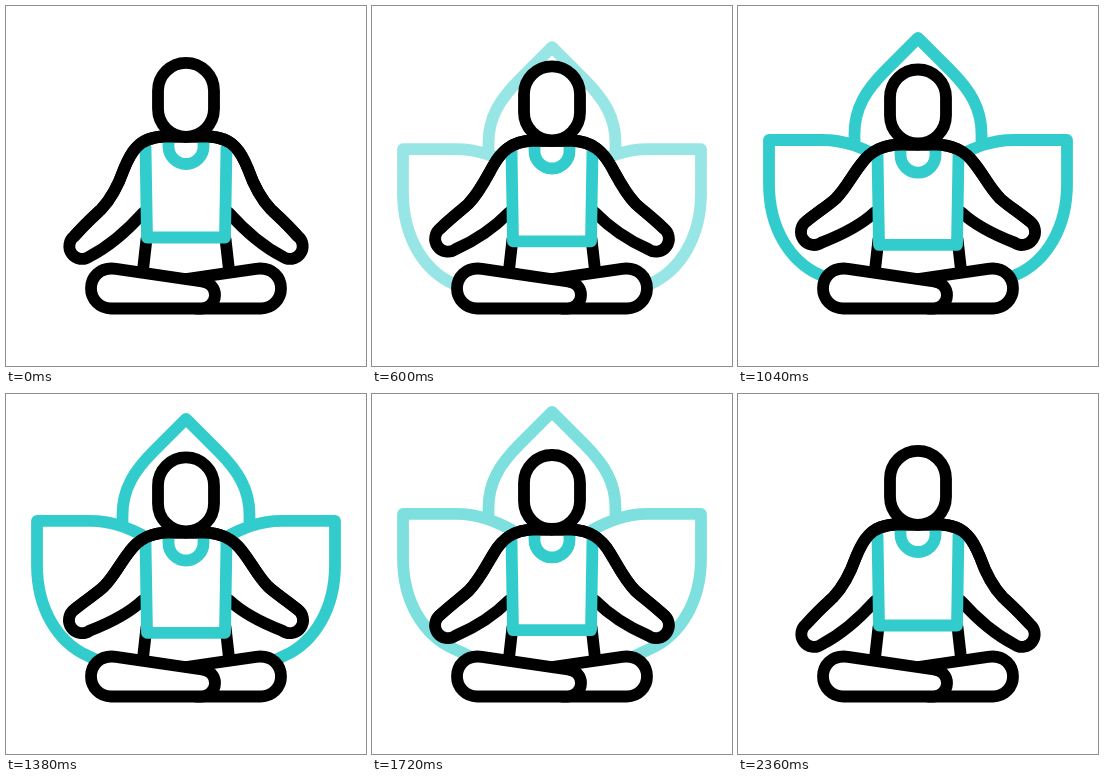
An HTML page with a canvas that plays this animation: 360 px wide and 360 px high, repeating every 2400 ms.

```html
<!DOCTYPE html>
<html lang="en">
<head>
<meta charset="utf-8">
<title>Meditation</title>
<style>
  html, body { margin: 0; width: 100%; height: 100%; overflow: hidden; background: #fff; }
  canvas { display: block; width: 360px; height: 360px; }
</style>
</head>
<body>
<canvas id="stage" width="360" height="360"></canvas>
<script>
const LOOP = 2400;
const LINE = 11.8;
const TEAL = '#33cccc';
const BLACK = '#000';
const ctx = document.getElementById('stage').getContext('2d');

const clamp = v => Math.max(0, Math.min(1, v));
const mix = (a, b, k) => a.map((v, i) => v + (b[i] - v) * k);

// Upper arm contour: three cubic curves from the shoulder to the hand.
const ARM_LOW = [158, 130.5, 132, 131, 124, 148, 118, 163, 112, 180, 106, 192, 95, 203.5, 88, 210, 80, 217, 68.5, 230];
const ARM_HIGH = [163, 139, 146, 139, 133, 145, 124, 157, 114, 169, 108, 182, 98, 192, 91, 198.5, 82, 204, 68.5, 214.5];

// Lower arm contour: one curve from the hand to the waist.
const UNDER_LOW = [83.5, 250.5, 100, 242, 120, 226, 137, 207];
const UNDER_HIGH = [83.5, 236, 102, 229, 122, 220, 137, 206];

const LOTUS_HALF = new Path2D(
  'M180 32L148 64C128 84 116.5 102 116.5 128V139' +
  'M140 150C124 142 108 134 84 134H31V178C31 221 51 255 82 269L112 283');
const lotus = new Path2D(LOTUS_HALF);
lotus.addPath(LOTUS_HALF, new DOMMatrix([-1, 0, 0, 1, 360, 0]));

const backLeg = new Path2D('M180 273L250 262.8C267 260.5 275 272 275 282.5A20 20 0 0 1 255 302.5H190');
const frontLeg = new Path2D('M195 302.5H105A20 20 0 0 1 85 282.5C85 272 93 260.5 110 262.8L196 275.5A13.5 13.5 0 0 1 195 302.5Z');
const torso = new Path2D('M140.5 233L137 264');

function bothSides(draw) {
  draw();
  ctx.save();
  ctx.translate(360, 0);
  ctx.scale(-1, 1);
  draw();
  ctx.restore();
}

function stroke(path, color, width = LINE) {
  ctx.strokeStyle = color;
  ctx.lineWidth = width;
  ctx.stroke(path);
}

function fill(path) {
  ctx.fillStyle = '#fff';
  ctx.fill(path);
}

function armPaths(p) {
  const a = mix(ARM_LOW, ARM_HIGH, p);
  const u = mix(UNDER_LOW, UNDER_HIGH, p);
  const upper = `M180 ${a[1]}L${a[0]} ${a[1]}C${a.slice(2, 8)}C${a.slice(8, 14)}C${a.slice(14)}`;
  const whole = `${upper}A12.5 12.5 0 0 0 ${u[0]} ${u[1]}C${u.slice(2)}`;
  return {
    upper: new Path2D(upper),
    whole: new Path2D(whole),
    area: new Path2D(`${whole}L139 263H180Z`)
  };
}

function headPath(dy) {
  const head = new Path2D();
  head.roundRect(152, 56.8 + dy, 56, 74, 28);
  return head;
}

function drawLotus(t, alpha) {
  ctx.save();
  ctx.translate(0, (1040 - t) * 0.0207);
  ctx.globalAlpha = alpha;
  stroke(lotus, TEAL);
  ctx.restore();
}

function drawShirt(p) {
  const top = 141 + 8 * p;
  const hem = 231.5 + 7.8 * p;
  const neck = 140.5 + 9 * p;
  stroke(new Path2D(`M139.5 ${top}L141 ${hem}H219L220.5 ${top}`), TEAL);
  stroke(new Path2D(`M162.5 ${neck - 6}V${neck}A17.5 17.5 0 0 0 197.5 ${neck}V${neck - 6}`), TEAL);
}

function draw(t) {
  const p = (1 - Math.cos(2 * Math.PI * t / LOOP)) / 2;
  const alpha = Math.min(clamp((t - 300) / 600), clamp((2100 - t) / 600));
  const arm = armPaths(p);
  const head = headPath(7 * p);

  ctx.fillStyle = '#fff';
  ctx.fillRect(0, 0, 360, 360);
  ctx.lineCap = ctx.lineJoin = 'round';

  if (alpha > 0) {
    drawLotus(t, alpha);
    // A clear margin keeps the faint petals away from the figure.
    const margin = 8 * clamp((0.3 - alpha) / 0.1);
    if (margin > 0) {
      const width = LINE + 2 * margin;
      bothSides(() => stroke(arm.whole, '#fff', width));
      [head, backLeg, frontLeg].forEach(part => stroke(part, '#fff', width));
    }
  }

  bothSides(() => {
    fill(arm.area);
    stroke(torso, BLACK);
    stroke(arm.whole, BLACK);
  });
  drawShirt(p);
  bothSides(() => stroke(arm.upper, BLACK));

  for (const part of [head, backLeg, frontLeg]) {
    fill(part);
    stroke(part, BLACK);
  }
}

function tick() {
  draw(performance.now() % LOOP);
  requestAnimationFrame(tick);
}
tick();
</script>
</body>
</html>
```
